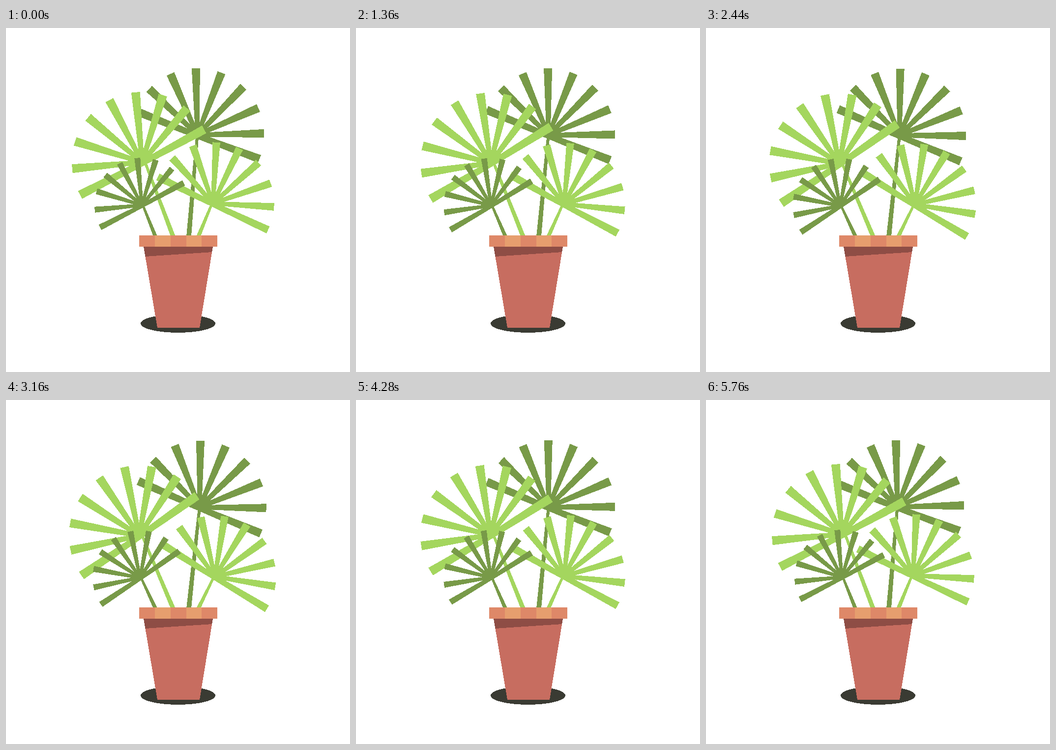
An HTML page for the animation above (5.8 s loop, 700 by 700 pixels).

```html
<!DOCTYPE html>
<html lang="en">
<head>
<meta charset="utf-8">
<title>Potted palm</title>
<style>
  html, body { margin: 0; width: 100%; height: 100%; overflow: hidden; background: #fff; }
  svg { display: block; width: 100vw; height: 100vh; }
</style>
</head>
<body>
<svg viewBox="0 0 700 700" shape-rendering="crispEdges">
  <ellipse cx="350" cy="601.3" rx="76" ry="18.6" fill="#3a3b33"/>
  <g id="plant"></g>
  <path d="M280 445H421L394 610H308Z" fill="#c76d60"/>
  <path d="M280 445H421L419.2 456L283.4 465Z" fill="#8e4d45"/>
  <path d="M271 422H430V445H271Z" fill="#de8868"/>
  <path d="M303 422H335V445H303ZM367 422H398V445H367Z" fill="#e69e6e"/>
</svg>
<script>
const LIGHT = '#a4d65e', DARK = '#789a48';
const FRAME = 40, FRAMES = 145, HALF = 72, BLADES = 9;

// Back to front. x, y, r: fan centre and radius; angle: first blade;
// dx, dy, turn: full sway; baseX, baseW: stem at the rim; join: stem offset from the centre
const fans = [
  { color: DARK, x: 389.4, y: 217.5, r: 135.6, angle: -158.8, dx: 4.7, dy: 0.8, turn: 2, baseX: 372, baseW: 10, join: 0 },
  { color: LIGHT, x: 421.2, y: 357, r: 124.4, angle: -154.3, dx: 4.1, dy: 2.6, turn: 6.1, baseX: 391.5, baseW: 9, join: -2 },
  { color: LIGHT, x: 277, y: 273, r: 142.8, angle: 152.2, dx: -6.1, dy: 3.1, turn: -7, baseX: 340, baseW: 10, join: 6 },
  { color: DARK, x: 276.5, y: 360.5, r: 96.4, angle: 152, dx: -3.8, dy: 1.25, turn: -6.4, baseX: 304, baseW: 8.5, join: 2 }
];

const plant = document.getElementById('plant');

function add(parent, tag, attrs = {}) {
  const node = document.createElementNS('http://www.w3.org/2000/svg', tag);
  for (const key in attrs) node.setAttribute(key, attrs[key]);
  return parent.appendChild(node);
}

for (const fan of fans) {
  const { r, color } = fan;
  const group = add(plant, 'g', { fill: color });
  fan.stem = add(group, 'path');
  fan.head = add(group, 'g');
  const inner = r * 0.03, outer = r * 0.063, edge = r * 0.055;
  for (let i = 0; i < BLADES; i++) {
    // The outer sides of the first and last blades form one nearly straight edge
    const before = i === 0 ? edge : inner;
    const after = i === BLADES - 1 ? edge : inner;
    add(fan.head, 'path', {
      d: `M0 ${-before}L${r} ${-outer}V${outer}L0 ${after}Z`,
      transform: `rotate(${fan.angle + i * 22.5})`
    });
  }
}

function draw(now) {
  const frame = Math.floor(now / FRAME) % FRAMES;
  const u = 1 - Math.abs(frame / HALF - 1);
  const sway = u * u * (3 - 2 * u);
  for (const fan of fans) {
    const x = fan.x + fan.dx * sway, y = fan.y + fan.dy * sway;
    const top = x + fan.join, half = fan.baseW / 2, neck = half * 0.6;
    fan.head.setAttribute('transform', `translate(${x} ${y}) rotate(${fan.turn * sway})`);
    fan.stem.setAttribute('d',
      `M${top - neck} ${y}H${top + neck}L${fan.baseX + half} 424H${fan.baseX - half}Z`);
  }
}

const start = performance.now();
function tick() {
  draw(performance.now() - start);
  requestAnimationFrame(tick);
}
tick();
</script>
</body>
</html>
```
